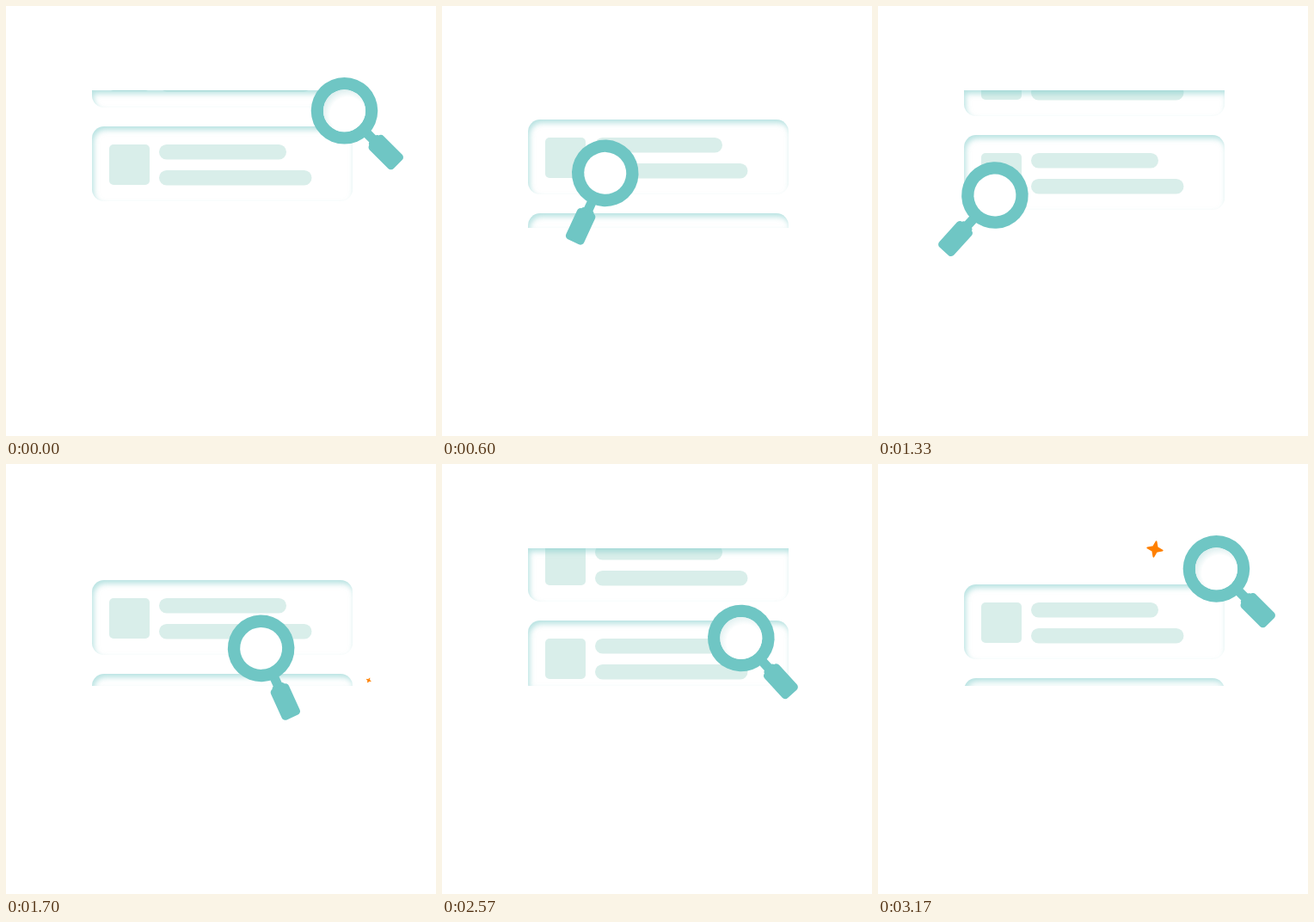
An HTML page for the animation above (3.21 s loop, 500x500 px).

```html
<!DOCTYPE html>
<html lang="en">
<head>
<meta charset="utf-8">
<title>Search animation</title>
<style>
  html, body { margin: 0; width: 100%; height: 100%; overflow: hidden; background: #fff; }
  svg { display: block; width: 100vw; height: 100vh; }
</style>
</head>
<body>
<svg viewBox="0 0 500 500">
  <defs>
    <clipPath id="view"><rect x="90" y="98" width="330" height="160"/></clipPath>
    <filter id="inner" filterUnits="userSpaceOnUse" x="80" y="80" width="350" height="200" color-interpolation-filters="sRGB">
      <feGaussianBlur in="SourceAlpha" stdDeviation="3"/>
      <feOffset dx="2.4" dy="4" result="hole"/>
      <feFlood flood-color="#6fc6c4" flood-opacity=".5"/>
      <feComposite in2="hole" operator="out"/>
      <feComposite in2="SourceAlpha" operator="in" result="shade"/>
      <feMerge><feMergeNode in="SourceGraphic"/><feMergeNode in="shade"/></feMerge>
    </filter>
    <radialGradient id="glass" cx=".58" cy=".6" r=".62">
      <stop offset=".68" stop-color="#fff"/>
      <stop offset="1" stop-color="#dceeee"/>
    </radialGradient>
    <g id="card">
      <rect x="100" y="140" width="303" height="87" rx="14" fill="#fff"/>
      <g fill="#d9eeea">
        <rect x="120" y="161" width="47" height="47" rx="5"/>
        <rect x="178" y="161" width="148" height="17.5" rx="8.75"/>
        <rect x="178" y="191" width="177.5" height="17.5" rx="8.75"/>
      </g>
    </g>
  </defs>

  <g filter="url(#inner)">
    <g clip-path="url(#view)">
      <g id="list"><use href="#card"/><use href="#card" y="-109"/></g>
    </g>
  </g>

  <path id="star" fill="#ff8000" stroke="#ff8000" stroke-width="2" stroke-linejoin="round"
    d="M0-8.8L2.3-2.3L8.8 0L2.3 2.3L0 8.8L-2.3 2.3L-8.8 0L-2.3-2.3Z"/>

  <g id="lens" fill="#6fc6c4">
    <rect x="36" y="-5.5" width="16" height="11"/>
    <rect x="46" y="-8" width="12" height="16" rx="4"/>
    <rect x="48.5" y="-11.5" width="39.5" height="23" rx="4.5"/>
    <circle r="38.8"/>
    <circle r="24.5" fill="#fff"/>
  </g>
  <circle id="shine" r="24.5" fill="url(#glass)"/>
</svg>

<script>
const LOOP = 3210, STEP = 100 / 3, SEG = 32, GAP = 109;
const $ = id => document.getElementById(id);
const mix = (a, b, p) => a + (b - a) * p;

// Resting poses, the easing that leaves each, and the lift of the path.
const poses = [
  { x: 393.5, y: 121.8, turn: 45, ease: [.8, .19], lift: -3.5 },
  { x: 122, y: 222, turn: 138, ease: [.7, .24], lift: -7 },
  { x: 339, y: 218, turn: 48, ease: [.85, .2], lift: 0 }
];
const stars = [null, [421.7, 251.5], [322, 99]];
const scroll = [[0, 0], [4, .014], [8, .092], [13, .385], [16, .853], [18, .927], [19, .954], [26, 1], [32, 1]];

// Cubic bezier easing with end heights 0 and 1, solved by bisection.
function bezier([x1, x2], x) {
  let lo = 0, hi = 1, s = .5;
  for (let i = 0; i < 24; i++) {
    s = (lo + hi) / 2;
    const r = 1 - s;
    if (3 * r * r * s * x1 + 3 * r * s * s * x2 + s * s * s < x) lo = s; else hi = s;
  }
  return s * s * (3 - 2 * s);
}

// Smooth curve through the points that never overshoots.
function curve(pts, x) {
  const slope = i => (pts[i + 1][1] - pts[i][1]) / (pts[i + 1][0] - pts[i][0]);
  const tangent = i => {
    if (i === 0 || i === pts.length - 1) return 0;
    const a = slope(i - 1), b = slope(i);
    return a * b > 0 ? 2 * a * b / (a + b) : 0;
  };
  let i = 0;
  while (i < pts.length - 2 && x > pts[i + 1][0]) i++;
  const w = pts[i + 1][0] - pts[i][0], u = (x - pts[i][0]) / w, v = 1 - u;
  return pts[i][1] * (1 + 2 * u) * v * v + pts[i + 1][1] * u * u * (3 - 2 * u)
    + w * u * v * (tangent(i) * v - tangent(i + 1) * u);
}

function draw(time) {
  const frame = Math.min(95, Math.floor((time % LOOP + 4) / STEP));
  const seg = Math.floor(frame / SEG), k = frame % SEG;

  $("list").setAttribute("transform", `translate(0 ${GAP * curve(scroll, k)})`);

  const a = poses[seg], b = poses[(seg + 1) % 3], p = bezier(a.ease, k / SEG);
  const x = mix(a.x, b.x, p), y = mix(a.y, b.y, p) + a.lift * 4 * p * (1 - p);
  $("lens").setAttribute("transform", `translate(${x} ${y}) rotate(${mix(a.turn, b.turn, p)})`);
  $("shine").setAttribute("transform", `translate(${x} ${y})`);
  $("shine").setAttribute("opacity", seg === 0 ? Math.max(0, 1 - 2 * p) : seg === 2 ? Math.min(1, 5 * p) : 0);

  // A finished star stays for the first frame of the next segment.
  const held = k === 0 && seg > 0;
  const spot = stars[held ? seg - 1 : seg];
  const grow = held ? 1 : Math.sin(Math.max(0, (k - 15.5) / 16.5) * Math.PI / 2);
  const on = spot && grow > 0;
  $("star").setAttribute("visibility", on ? "visible" : "hidden");
  if (on) $("star").setAttribute("transform",
    `translate(${spot}) rotate(${10 + 20 * (1 - grow)}) scale(${grow})`);
}

const start = performance.now();
function tick() {
  draw(performance.now() - start);
  requestAnimationFrame(tick);
}
tick();
</script>
</body>
</html>
```
